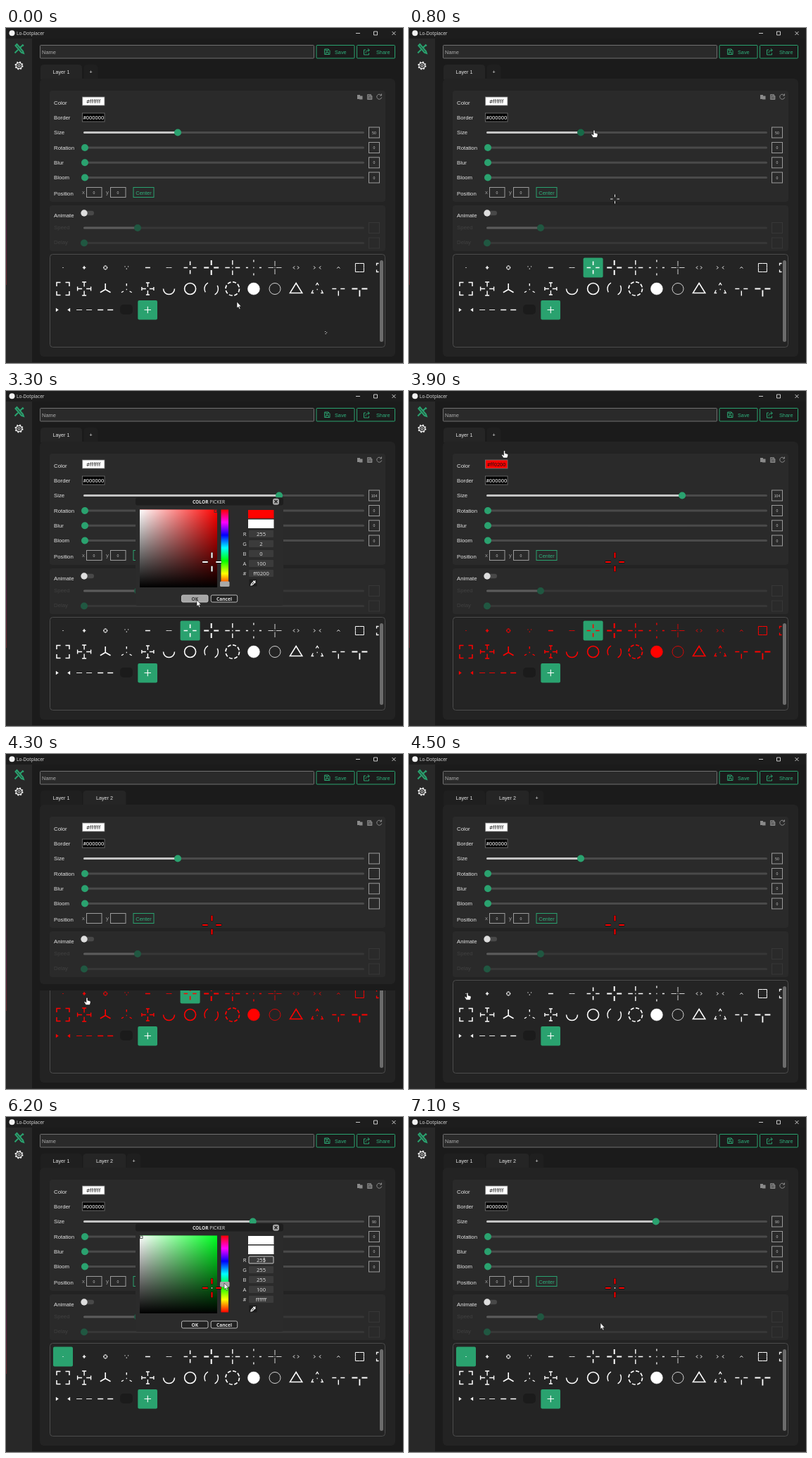
An HTML page for the animation above (7.2 s loop, 564 by 476 pixels).

```html
<!DOCTYPE html>
<html lang="en">
<head>
<meta charset="utf-8">
<title>Lo-Dotplacer</title>
<style>
html, body { margin: 0; width: 100%; height: 100%; overflow: hidden; background: #1b1b1b; }
svg { display: block; }
text { font-family: "Liberation Sans", Arial, sans-serif; font-size: 7.8px; fill: #e4e4e4; }
.mid { text-anchor: middle; }
.tab { font-size: 7.2px; }
.btn { font-size: 7.3px; fill: #2fb07c; }
.dim { fill: #414141; }
.num { font-size: 5.2px; fill: #c4c4c4; text-anchor: middle; }
.hex { font-family: Roboto, sans-serif; font-size: 7.5px; text-anchor: middle; }
.ui { font-family: "Open Sans", sans-serif; font-size: 6.6px; }
.field { font-size: 7.6px; text-anchor: middle; }
.line { fill: none; stroke: #9b9b9b; }
.green { fill: none; stroke: #2aa26f; }
</style>
</head>
<body>
<svg id="stage" width="564" height="476" viewBox="0 0 564 476">
  <defs>
    <linearGradient id="white"><stop stop-color="#fff"/><stop offset="1" stop-color="#fff" stop-opacity="0"/></linearGradient>
    <linearGradient id="black" x2="0" y2="1"><stop stop-opacity="0"/><stop offset="1"/></linearGradient>
    <linearGradient id="hues" x2="0" y2="1"></linearGradient>
    <linearGradient id="edge" x2="0" y2="1"><stop stop-color="#5b2043" stop-opacity="0"/><stop offset=".5" stop-color="#5b2043"/><stop offset="1" stop-color="#6a2a30"/></linearGradient>
    <clipPath id="gridClip"><rect id="gridWindow" x="62" width="468" height="132"/></clipPath>
  </defs>
</svg>
<script>
const LOOP = 7200, STEP = 100, GREEN = '#2aa26f';
const stage = document.getElementById('stage');
const $ = id => document.getElementById(id);

const rect = (x, y, w, h, more = '') => `<rect x="${x}" y="${y}" width="${w}" height="${h}" ${more}/>`;
const text = (x, y, s, cls = '', more = '') => `<text x="${x}" y="${y}" class="${cls}" ${more}>${s}</text>`;
const dot = (x, y, r, more = '') => `<circle cx="${x}" cy="${y}" r="${r}" ${more}/>`;
const path = (d, more = '') => `<path d="${d}" ${more}/>`;
const group = (id, body, more = '') => `<g id="${id}" ${more}>${body}</g>`;

// Window frame, sidebar and header
function frame() {
  return rect(0, 0, 564, 15, 'fill="#1d1d1d"') + rect(0, 15, 37, 461, 'fill="#282828"')
    + rect(0, 220, 1, 145, 'fill="url(#edge)"') + rect(0, 475, 564, 1, 'fill="#2f2f2f"')
    + dot(8.5, 7.3, 4, 'fill="#f2f2f2"') + text(15, 9.8, 'Lo-Dotplacer', 'ui', 'fill="#ddd"')
    + path('M497 7.5h6M522.5 5h5v5h-5zM548.5 5l5 5m0-5l-5 5', 'fill="none" stroke="#ddd" stroke-width=".9"')
    + path('M13.5 25l2-2 8.500 10 1 3-3-1zM23 23.500l2 2M12.500 35.500l4.500-4.500M20 28l4-4', 'class="green" stroke-width="2"')
    + gear(18.5, 53.5)
    + rect(48.5, 24.500, 389, 18.500, 'rx="1" fill="#2a2a2a" stroke="#707070"') + text(51, 36.5, 'Name', '', 'style="font-size:7.5px;fill:#aaa"')
    + rect(441, 24.5, 54, 18.5, 'rx="1" class="green"') + rect(498.5, 24.5, 54, 18.5, 'rx="1" class="green"')
    + path('M452.500 30h5.500l2 2v5.500h-7.500zM454.500 30v2.500h3v-2.500M454.500 37.500v-3h3.500v3', 'class="green"')
    + path('M511 31h-2.500v7h7v-2.500M511 35.500q0-4 5-4m-2-2.300l2.300 2.300-2.300 2.300', 'class="green"')
    + text(467, 36.5, 'Save', 'btn') + text(526, 36.5, 'Share', 'btn');
}

function gear(x, y) {
  return `<g transform="translate(${x} ${y})" fill="none" stroke="#eee">` + dot(0, 0, 4.2, 'stroke-width="1.2"')
    + dot(0, 0, 5.2, 'stroke-width="1.6" stroke-dasharray="2 2.084"') + dot(0, 0, 1.7) + '</g>';
}

const sliderX = size => 110.7 + 2.667 * size;

function slider(id, label, y, x, dim) {
  const yc = y - 2.5;
  return text(68, dim ? y - 1 : y, label, dim ? 'dim' : '')
    + rect(110, yc - 1.5, 399, 3, `rx="1.5" fill="${dim ? '#373737' : '#4a4a4a'}"`)
    + rect(110, yc - 1.5, x - 110, 3, `id="${id}Fill" rx="1.5" fill="${dim ? '#5c5c5c' : '#c4c4c4'}"`)
    + dot(x, yc, 5, `id="${id}Thumb" fill="${dim ? '#205741' : GREEN}"`)
    + rect(515.5, yc - 7.5, 15, 15, `class="line" ${dim ? 'style="stroke:#373737"' : ''}`);
}

const swatch = (id, y, fill, ink, s) => rect(108.5, y, 31.5, 12, `id="${id}" fill="${fill}" stroke="#777" stroke-width=".8"`)
  + text(124.2, y + 8.700, s, 'hex', `id="${id}Text" style="fill:${ink}"`);

function settings() {
  const box = x => rect(x, 226.5, 21.5, 14, 'class="line"');
  return rect(62, 89, 477, 158, 'rx="4" fill="#2a2a2a"') + rect(62, 252, 477, 65, 'rx="4" fill="#2a2a2a"')
    + text(68, 108.7, 'Color') + swatch('tint', 98, '#fff', '#111', '#ffffff')
    + text(68, 130, 'Border') + swatch('border', 121, '#000', '#fff', '#000000')
    + slider('size', 'Size', 151, 244) + slider('rot', 'Rotation', 172.5, 112)
    + slider('blur', 'Blur', 193.800, 112) + slider('bloom', 'Bloom', 215, 112)
    + text(68, 237.500, 'Position') + text(108, 236, 'x', '', 'style="fill:#999"') + box(114.500) + text(142, 236, 'y', '', 'style="fill:#999"') + box(148.5)
    + rect(181, 226.5, 29, 14, 'class="green"') + text(195.5, 236.500, 'Center', 'btn mid', 'style="font-size:7.5px"')
    + group('values', text(523, 150.500, '50', 'num', 'id="sizeText"')
      + [172, 193.200, 214.500].map(y => text(523, y, '0', 'num')).join('') + text(125, 235.500, '0', 'num') + text(159, 235.5, '0', 'num'))
    + text(68, 268.500, 'Animate') + rect(108, 259.700, 17, 6.500, 'rx="3.2" fill="#484848"') + dot(111, 263, 4.700, 'fill="#dedede"')
    + slider('speed', 'Speed', 286.500, 187, true) + slider('delay', 'Delay', 308, 111, true)
    + path('M499 95h4v6h-4zM502 96.500h4.500v5h-4.500z', 'fill="#8a8a8a"')
    + path('M513.500 94.500h5v7h-5zM515.500 96.500h4.500v5h-4.500z', 'fill="#555" stroke="#8a8a8a" stroke-width=".9"')
    + path('M533 95.500a3.500 3.500 0 1 0 .7 3M533.500 93.500v2.500h-2.500', 'fill="none" stroke="#8a8a8a"');
}

// Shape library, drawn around 0,0
const cross = (a, b) => `M${-b} 0H${-a}M${a} 0H${b}M0 ${-b}V${-a}M0 ${a}V${b}`;
const ring = r => `M${r} 0A${r} ${r} 0 1 1 ${-r} 0A${r} ${r} 0 1 1 ${r} 0`;
const corners = (r, n) => [[1, 1], [1, -1], [-1, 1], [-1, -1]].map(([i, j]) => `M${i * (r - n)} ${j * r}H${i * r}V${j * (r - n)}`).join('');
const caps = (r, n) => `M${-r} ${-n}V${n}M${r} ${-n}V${n}M${-n} ${-r}H${n}M${-n} ${r}H${n}`;
const spokes = (a, b) => [0, 1, 2].map(k => {
  const s = Math.sin(k * 2.094), c = -Math.cos(k * 2.094);
  return `M${a * s} ${1 + a * c}L${b * s} ${1 + b * c}`;
}).join('');
const speck = (x, y) => `M${x - .6} ${y}h1.2`;
const dashes = (a, b) => `M${-b} 0H${-a}M${a} 0H${b}`;

// Each entry: path, line width, dash pattern, filled
const shapes = [
  [speck(0, 0), 1.2], [cross(0, 2.2), 1.5], [cross(1.2, 3.2) + ring(2.6), .8],
  [speck(-2.3, -1.5) + speck(2.3, -1.5) + speck(0, 1.700), 1.2], [dashes(0, 3.5), 1.6], [dashes(0, 4), .8],
  [cross(3.5, 9), 1.6], [cross(3.5, 10.5), 2], [cross(4, 10.5) + speck(0, 0), 1.4], [cross(8, 11) + speck(0, 0), 1.3],
  [cross(2, 9.5) + speck(0, 0), .8], ['M-2-2l-2 2 2 2M2-2l2 2-2 2', 1], ['M-5-2l2 2-2 2M5-2l-2 2 2 2', 1],
  ['M-2 1L0-1 2 1', 1], [corners(6, 6), 1], [corners(6, 3), 1.3],
  [corners(9, 5.500), 1.500], [cross(3, 9.5) + caps(9.5, 3), 1.4], [spokes(0, 8.5), 1.6],
  [spokes(5, 8.5) + speck(0, 1), 1.4], [cross(2.5, 8.5) + caps(8.5, 2.5), 1.4], ['M-8 0A8 8 0 0 0 8 0', 1.5],
  [ring(8), 1.6], [ring(9.7), 1.4, '10 5.24 0'], [ring(9.7), 1.7, '5 2.62'], [ring(8.5), .5, '', true],
  [ring(8), .8], ['M0-8L8.700 6H-8.7Z', 1.5], ['M-2-5L0-8 2-5M-6 2L-8 6h3M6 2L8 6h-3' + speck(0, 1), 1.3],
  [dashes(3, 9) + 'M0 3V10', 1.4], [dashes(3, 11) + 'M0 2V11', 1.8],
  ['M-10-2.500l3.500 2.500-3.500 2.500zM10-2.500l-3.500 2.500 3.500 2.500z', .3, '', true],
  [dashes(3, 11), .9], [dashes(3, 11), 1.6]
];
const spot = i => i < 16 ? [81 + 30.1 * i, 340.5] : i < 31 ? [81 + 30.1 * (i - 16), 370.5] : [81 + 30.1 * (i - 31), 400.5];

function grid() {
  const art = shapes.map(([d, w, dash = '', full], i) => path(d, `transform="translate(${spot(i)})" stroke-width="${w}" `
    + `stroke-dasharray="${dash || 'none'}" fill="${full ? 'currentColor' : 'none'}"`)).join('');
  const list = rect(62.5, 321.5, 476, 132, 'rx="4" fill="#242424" stroke="#4c4c4c"')
    + rect(531, 330, 5, 116, 'rx="2.5" fill="#6b6b6b"')
    + `<g clip-path="url(#gridClip)">${rect(0, 326.500, 28, 28, `id="picked" rx="2" fill="${GREEN}"`)}`
    + group('art', art, 'stroke="currentColor"') + rect(162, 393, 18, 14, 'rx="5" fill="#1b1b1b"')
    + rect(187.300, 387, 27.700, 27.500, `rx="2" fill="${GREEN}"`) + path('M196.500 400.500h9.500m-4.700-4.700v9.500', 'stroke="#fff" stroke-width="1.1"') + '</g>';
  const cover = rect(48, 318, 505, 18, 'fill="#1b1b1b"') + path('M48 317H553V321a6 6 0 0 1-6 6H54a6 6 0 0 1-6-6z', 'fill="#232323"');
  return list + group('cover', cover);
}

function tab(id, x, w, s) {
  return group(id, path(`M${x} 73V57q0-5 5-5h${w - 10}q5 0 5 5v16z`) + text(x + w / 2, 64.500, s, 'tab mid'));
}

function picker() {
  const rows = ['R', 'G', 'B', 'A', '#'].map((s, i) => {
    const y = 203 + 14 * i;
    return text(339, y + 2.700, s, 'ui field') + rect(345, y - 5, 35, 10, `id="cell${i}" rx="1" fill="#3b3b3b"`)
      + text(362.5, y + 2.700, '', 'ui field', `id="ch${i}"`);
  }).join('');
  const button = (id, x, s) => rect(x, 290, 37.500, 10, `id="${id}" rx="2" fill="#222" stroke="#c8c8c8" stroke-width=".9"`)
    + text(x + 18.800, 297.500, s, 'ui mid', `id="${id}Text" style="font-weight:bold"`);
  return rect(184, 151.500, 210, 153.500, 'rx="3" fill="#2b2b2b"') + rect(184, 151.500, 210, 11, 'rx="3" fill="#1e1e1e"')
    + text(288, 159.700, '<tspan font-weight="bold">COLOR</tspan> PICKER', 'ui mid')
    + rect(379, 152.700, 9, 9, 'rx="3" fill="#a8a8a8"') + path('M381.500 155l4 4.300m0-4.300l-4 4.300', 'stroke="#222" stroke-width="1.3"')
    + ['id="hue"', 'fill="url(#white)"', 'fill="url(#black)"'].map(f => rect(190, 168.500, 110, 110.500, f)).join('')
    + rect(0, 169, 3.500, 3.500, 'id="mark" fill="none" stroke="#333" stroke-width=".8"')
    + rect(305.500, 168.500, 10.500, 109, 'fill="url(#hues)"') + rect(304, 0, 13.500, 7.500, 'id="hueThumb" rx="1.5" fill="#a9a9a9"')
    + rect(344, 169, 36.500, 12, 'id="fresh"') + rect(344, 182.500, 36.500, 12.500, 'fill="#fff"')
    + rows + path('M366.800 199.500v7', 'id="caret" stroke="#fff" stroke-width=".7"')
    + rect(345.500, 267.500, 11, 10, 'rx="1" fill="#1c1c1c"') + path('M348 276l.5-2 3.500-3.500 1.500 1.500-3.500 3.500zM351.500 269.500l3 3M353 271l1.500-1.500', 'fill="none" stroke="#fff" stroke-width="1.1"')
    + button('ok', 249.500, 'OK') + button('cancel', 291.200, 'Cancel');
}

function overlay() {
  return group('sight', path(cross(5.500, 13.7), 'stroke="#000" stroke-width="3.2"') + path(cross(5.800, 13.400), 'stroke="currentColor" stroke-width="2.1"'))
    + group('point', dot(292.500, 243, 1.1, 'fill="#fff" stroke="#000" stroke-width=".4"'))
    + path('M453 431.500h1.200M455 432.800h1.200M453.500 434.500h1.200', 'id="flecks" stroke="#ddd"')
    + `<g id="cursor" fill="#fff" stroke="#000" stroke-width=".5">`
    + path('M0 0V9L2 7.200 3.600 10.600 5 10 3.500 6.700H6.200Z', 'id="arrow"')
    + path('M-1 .8Q0-.6 1 .8V4L4.500 5Q5.500 5.400 5 7.500L4 10.500H-1.500L-4 6.600Q-3.600 5.400-2.400 6L-1 7Z', 'id="hand"') + '</g>';
}

$('hues').innerHTML = [0, 1, 2, 3, 4, 5, 6].map(i => `<stop offset="${i / 6}" stop-color="hsl(${360 - 60 * i},100%,50%)"/>`).join('');
stage.insertAdjacentHTML('beforeend', frame()
  + tab('tab1', 49, 59, 'Layer 1') + tab('tab2', 109.500, 61, 'Layer 2') + tab('plus', 0, 20, '+')
  + rect(48, 72, 505, 395, 'rx="6" fill="#232323"') + settings() + grid()
  + group('picker', picker()) + overlay());

// Pointer track: time, x, y
const moves = [
  [0, 328, 389], [400, 264, 342], [500, 264, 340], [700, 246, 145], [800, 263, 145], [1500, 388, 146],
  [1600, 386, 146], [2000, 126, 104], [2200, 142, 123], [2700, 298, 170], [2900, 299, 169], [3300, 271, 297],
  [3500, 270, 296], [4000, 120, 60], [4300, 115, 346], [4500, 83, 339], [4600, 83, 338], [4800, 246, 145],
  [4900, 252, 145], [5300, 351, 146], [5600, 126, 102], [5800, 128, 104], [6200, 310, 236], [6500, 298, 170],
  [6600, 298, 170], [7000, 272, 293], [7200, 272, 292]
];
const within = (t, a, b) => t >= a && t < b;
const ramp = (t, a, b) => Math.min(1, Math.max(0, (t - a) / (b - a)));

function pointer(t) {
  const i = moves.findIndex(m => m[0] > t), [a, x, y] = moves[i - 1], [b, u, v] = moves[i];
  const k = ramp(t, a, b), e = i === 5 || i === 19 ? k : k * k * (3 - 2 * k);
  return [x + (u - x) * e, y + (v - y) * e];
}

const show = (id, on) => { $(id).style.display = on ? '' : 'none'; };
const set = (id, attrs) => { for (const k in attrs) $(id).setAttribute(k, attrs[k]); };
const hex = rgb => rgb.map(n => n.toString(16).padStart(2, '0')).join('');

function drawPicker(t, second) {
  const picked = t >= (second ? 6500 : 2700), green = second && t >= 6200;
  const rgb = !picked ? [255, 255, 255] : second ? [0, 255, 34] : [255, 2, 0];
  const over = within(t, 3200, 3600) || t >= 6900;
  set('hue', { fill: green ? '#00ff22' : '#ff0200' });
  set('hueThumb', { y: green ? 234 : 270.500 });
  set('mark', { x: picked ? 296 : 190.500 });
  set('fresh', { fill: '#' + hex(rgb) });
  [...rgb, 100, hex(rgb)].forEach((v, i) => { $('ch' + i).textContent = v; });
  set('cell0', { stroke: picked ? 'none' : '#ccc' });
  show('caret', !picked);
  set('ok', { fill: over ? '#a6a6a6' : '#222' });
  $('okText').style.fill = over ? '#333' : '';
}

function render(t) {
  const second = t >= 4200, loading = within(t, 4200, 4400), red = within(t, 3600, 4400);
  const size = Math.round(second ? 50 + 40 * ramp(t, 4900, 5300) : 50 + 54 * ramp(t, 800, 1500));
  const x = sliderX(size), tinted = red && !second;
  const open = within(t, 2100, 3600) || within(t, 5800, 7100);

  show('tab2', second);
  show('plus', !loading);
  set('plus', { transform: `translate(${second ? 171.500 : 110.500} 0)` });
  set('tab1', { fill: second ? '#1f1f1f' : '#252525' });
  set('tab2', { fill: '#252525' });
  set('plus', { fill: '#1f1f1f' });

  set('sizeFill', { width: x - 110 });
  set('sizeThumb', { cx: x, fill: within(t, 700, 1600) || within(t, 4800, 5400) ? '#176a48' : GREEN });
  $('sizeText').textContent = size;
  show('values', !loading);
  set('tint', { fill: tinted ? '#ff0200' : '#fff' });
  $('tintText').textContent = tinted ? '#ff0200' : '#ffffff';

  const choice = t < 4400 ? 6 : 0;
  show('picked', within(t, 500, 4400) || t >= 4600);
  set('picked', { x: spot(choice)[0] - 14 });
  $('art').style.color = red ? '#ff0200' : '#fff';
  show('cover', loading);
  set('gridWindow', { y: loading ? 336 : 322 });

  show('picker', open);
  if (open) drawPicker(t, second);

  show('sight', t >= 500);
  $('sight').style.color = t >= 3600 ? '#ff0200' : '#fff';
  set('sight', { transform: `translate(292.500 243) scale(${(second ? 104 : size) / 104})` });
  show('point', t >= 4600);
  show('flecks', t < STEP);

  const hand = within(t, 300, 1700) || within(t, 1900, 2100) || within(t, 3900, 5800);
  set('cursor', { transform: `translate(${pointer(t)})` });
  show('hand', hand);
  show('arrow', !hand);
}

const start = performance.now();
function tick() {
  const t = (performance.now() - start) % LOOP;
  render(Math.floor(t / STEP) * STEP);
  requestAnimationFrame(tick);
}
tick();
</script>
</body>
</html>
```
